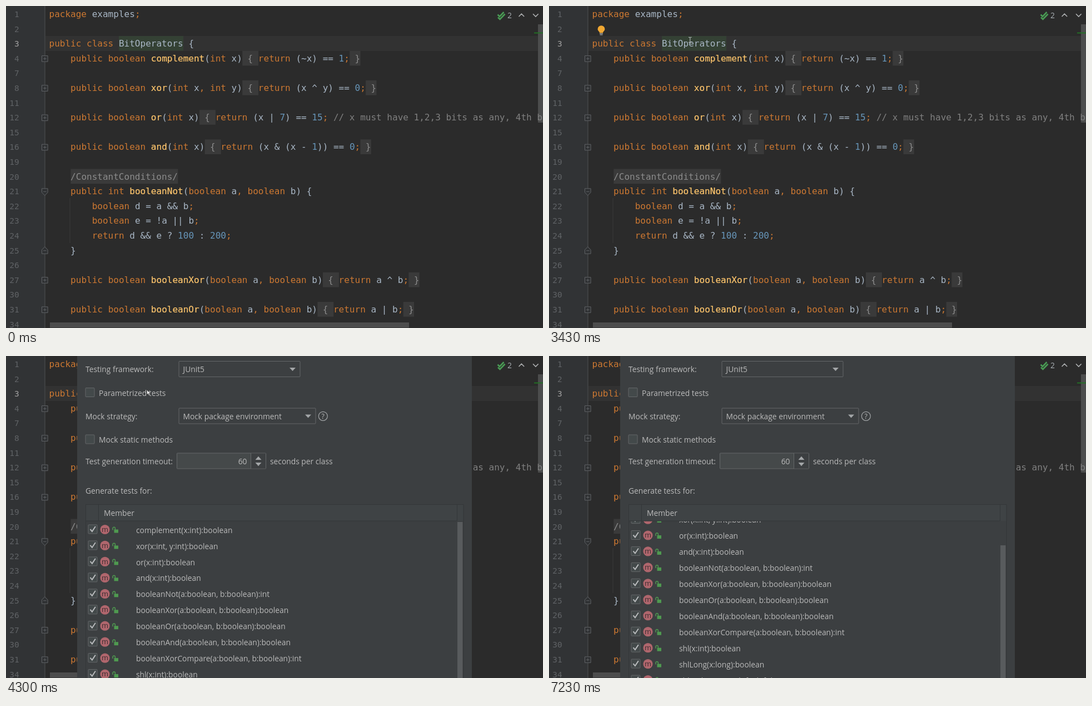
Write an HTML page that moves like this. It is 966x580 px and loops after 8000 ms.

```html
<!DOCTYPE html>
<html lang="en">
<head>
<meta charset="utf-8">
<title>Test generation dialog</title>
<style>
  html, body { margin: 0; width: 100%; height: 100%; overflow: hidden; background: #2b2b2b; }
  svg { display: block; width: 100%; height: 100%; }
  text { white-space: pre; }
  .code { font: 16.03px "DejaVu Sans Mono", monospace; }
  .num { font: 14.5px "DejaVu Sans Mono", monospace; }
  .ui { font: 13.8px "Open Sans", "Noto Sans", sans-serif; fill: #bbbbbb; }
</style>
</head>
<body>
<svg id="stage" viewBox="0 0 966 580"></svg>
<script>
const NS = 'http://www.w3.org/2000/svg';
const stage = document.getElementById('stage');

function add(parent, tag, attrs = {}, content) {
  const el = document.createElementNS(NS, tag);
  for (const key in attrs) el.setAttribute(key, attrs[key]);
  if (content !== undefined) el.textContent = content;
  parent.appendChild(el);
  return el;
}
const rect = (p, x, y, width, height, fill, more) =>
  add(p, 'rect', { x, y, width, height, fill, ...more });
const path = (p, d, fill, more) => add(p, 'path', { d, fill, ...more });
const line = (p, d, stroke, width = 1) => path(p, d, 'none', { stroke, 'stroke-width': width });
const show = (el, on) => el.setAttribute('visibility', on ? 'visible' : 'hidden');

// ---------- Editor ----------
const LEFT = 77.5, COL = 9.65, LINE = 26.6;
const ORANGE = '#cc7832', PLAIN = '#a9b7c6';
const KEYWORDS = /^(package|public|class|boolean|int|return)$/;

// Square brackets mark folded regions.
const SOURCE = [
  [1, 'package examples;'],
  [2, ''],
  [3, 'public class BitOperators {'],
  [4, '    public boolean complement(int x)[ { ]return (~x) == 1;[ }]'],
  [7, ''],
  [8, '    public boolean xor(int x, int y)[ { ]return (x ^ y) == 0;[ }]'],
  [11, ''],
  [12, '    public boolean or(int x)[ { ]return (x | 7) == 15; // x must have 1,2,3 bits as any, 4th b'],
  [15, ''],
  [16, '    public boolean and(int x)[ { ]return (x & (x - 1)) == 0;[ }]'],
  [19, ''],
  [20, '    [/ConstantConditions/]'],
  [21, '    public int booleanNot(boolean a, boolean b) {'],
  [22, '        boolean d = a && b;'],
  [23, '        boolean e = !a || b;'],
  [24, '        return d && e ? 100 : 200;'],
  [25, '    }'],
  [26, ''],
  [27, '    public boolean booleanXor(boolean a, boolean b)[ { ]return a ^ b;[ }]'],
  [30, ''],
  [31, '    public boolean booleanOr(boolean a, boolean b)[ { ]return a | b;[ }]'],
  [34, '']
];

function tokenColor(token, next) {
  if (KEYWORDS.test(token) || /^[,;]$/.test(token)) return ORANGE;
  if (/^\d/.test(token)) return '#6897bb';
  if (token.startsWith('//')) return '#808080';
  if (/^\w/.test(token) && next === '(') return '#ffc66d';
  return PLAIN;
}

function drawCode(parent, src, mid) {
  let brackets = 0;
  for (const m of src.matchAll(/\[[^\]]*\]|\/\/.*|\w+|[^\w\s]/g)) {
    let token = m[0];
    const x = LEFT + (m.index - brackets) * COL;
    let fill = tokenColor(token, src[m.index + token.length]);
    if (token[0] === '[') {
      token = token.slice(1, -1);
      brackets += 2;
      fill = '#8c8c8c';
      rect(parent, x + 0.3, mid - 13.3, token.length * COL, LINE, '#3a3a3a');
    }
    const bold = fill === '#ffc66d' ? { stroke: fill, 'stroke-width': 0.2 } : {};
    add(parent, 'text', { class: 'code', x, y: mid + 5.6, fill, ...bold }, token);
  }
}

function drawFold(parent, n, src, y) {
  const stroke = '#606366', cx = 69.8;
  const box = (d, sign) => {
    path(parent, d, '#2f3133', { stroke });
    line(parent, sign, stroke);
  };
  const minus = `M${cx - 2.7} ${y}h5.4`;
  if (n === 21) box(`M${cx - 5.3} ${y - 5.5}h10.6v7l-5.3 5.5l-5.3 -5.5z`, minus);
  else if (n === 25) box(`M${cx - 5.3} ${y + 5.5}h10.6v-7l-5.3 -5.5l-5.3 5.5z`, minus);
  else if (src.includes('[ {'))
    box(`M${cx - 5.3} ${y - 5.3}h10.6v10.6h-10.6z`, `${minus}M${cx} ${y - 2.7}v5.4`);
}

const editor = add(stage, 'g');
rect(editor, 0, 0, 966, 580, '#2b2b2b');
rect(editor, 0, 0, 70, 580, '#313335');
rect(editor, 71, 54, 895, 27, '#323232');
line(editor, 'M70 0V580', '#505355');
line(editor, 'M115 346V427', '#3b3b3b');
rect(editor, 79, 570, 646, 9.5, '#4d4d4d');
rect(editor, 957, 33, 9, 177, '#4c4d4d');
rect(editor, 203, 54, 116, 26.5, '#344134');
SOURCE.forEach(([n, src], i) => {
  const mid = 14.3 + i * LINE;
  add(editor, 'text', {
    class: 'num', x: 23.8, y: mid + 5.6, 'text-anchor': 'end', fill: n === 3 ? '#a4a3a3' : '#606366'
  }, n);
  drawFold(editor, n, src, mid + 0.8);
  drawCode(editor, src, mid);
});
rect(editor, 950, 47.5, 16, 2, '#236e25');
line(editor, 'M884.5 15.5l3.5 3.5l7.5 -8M885 20.5l3.5 3.5l9 -9.5', '#499c54', 2.6);
add(editor, 'text', { class: 'ui', x: 902, y: 22, style: 'fill:#a9b0b5' }, '2');
line(editor, 'M922.5 19l4.8 -4.8l4.8 4.8M948 14.3l4.8 4.8l4.8 -4.8', '#afb1b3', 1.6);

const caret = rect(editor, 251, 55, 2, 23, '#bbbbbb');
const bulb = add(editor, 'g');
path(bulb, 'M91 48.5C91 46 87.6 45 87.6 41.6A6.4 6.4 0 0 1 100.4 41.6C100.4 45 97 46 97 48.5Z', '#f0a732');
rect(bulb, 91, 49, 6, 1.3, '#a0a3a5');
rect(bulb, 91.5, 51.2, 5, 1.3, '#a0a3a5');

// ---------- Dialog ----------
const dialog = add(stage, 'g');
const BORDER = '#646769', ICON = '#a3a6a8';
const label = (p, x, mid, text, more) => add(p, 'text', { class: 'ui', x, y: mid + 4.9, ...more }, text);
const arrowDown = (x, y) => path(dialog, `M${x - 5.5} ${y - 3}h11l-5.5 6z`, ICON);
const box = (p, x, y, w, h, fill) => rect(p, x + 0.5, y + 0.5, w - 1, h - 1, fill, { stroke: BORDER, rx: 1 });

function combo(x, y, w, text) {
  box(dialog, x, y, w, 29, '#3c3f41');
  label(dialog, x + 8, y + 15.5, text);
  arrowDown(x + w - 14, y + 15);
}
function checkbox(p, x, y, checked) {
  box(p, x, y, 17, 17, '#43494a');
  if (checked) line(p, `M${x + 4} ${y + 8.5}l3.4 4l6 -9`, '#b8babc', 2);
}

rect(dialog, 128, -20, 710, 610, '#3c3f41');
label(dialog, 143, 24.5, 'Testing framework:');
combo(310.5, 9, 219, 'JUnit5');
checkbox(dialog, 142.5, 57);
label(dialog, 167, 67, 'Parametrized tests');
label(dialog, 143, 109, 'Mock strategy:');
combo(310.5, 93.5, 247, 'Mock package environment');
add(dialog, 'circle', { cx: 570.3, cy: 108.3, r: 8, fill: 'none', stroke: ICON, 'stroke-width': 1.2 });
label(dialog, 570.3, 108.2, '?', { 'text-anchor': 'middle', style: 'font-size:12.5px' });
checkbox(dialog, 142.5, 141.5);
label(dialog, 167, 151.5, 'Mock static methods');
label(dialog, 143, 190, 'Test generation timeout:');
box(dialog, 307, 174.5, 161, 29, '#45494a');
rect(dialog, 441, 175.5, 26, 27, '#3c3f41');
line(dialog, 'M440.5 175V203', BORDER);
label(dialog, 433.5, 190, '60', { 'text-anchor': 'end' });
path(dialog, 'M448.5 187h11l-5.5 -6.2zM448.5 192h11l-5.5 6.2z', ICON);
label(dialog, 475, 190, 'seconds per class');
label(dialog, 143, 243.5, 'Generate tests for:');

// ---------- Member table ----------
const ROW = 28.95, ROWS_TOP = 299, SCROLL = 47.4;
const MEMBERS = [
  'complement(x:int):boolean', 'xor(x:int, y:int):boolean', 'or(x:int):boolean', 'and(x:int):boolean',
  'booleanNot(a:boolean, b:boolean):int', 'booleanXor(a:boolean, b:boolean):boolean',
  'booleanOr(a:boolean, b:boolean):boolean', 'booleanAnd(a:boolean, b:boolean):boolean',
  'booleanXorCompare(a:boolean, b:boolean):int', 'shl(x:int):boolean', 'shlLong(x:long):boolean',
  'shlWithBigLongShift(shift:long):int'
];

const clip = add(add(stage, 'defs'), 'clipPath', { id: 'rows' });
rect(clip, 143, 297.5, 668, 300, '#fff');
rect(dialog, 143, 267, 680, 30, '#3f4345');
const table = add(dialog, 'g', { 'clip-path': 'url(#rows)' });
const rows = add(table, 'g');
const hover = rect(rows, 229, 0, 582, ROW, '#464b4e');
MEMBERS.forEach((name, i) => {
  const mid = ROWS_TOP + 14.5 + i * ROW;
  checkbox(rows, 147.5, mid - 10, true);
  add(rows, 'circle', { cx: 178, cy: mid - 1, r: 8.6, fill: '#b0666d' });
  label(rows, 178, mid - 1.7, 'm', { 'text-anchor': 'middle', style: 'fill:#3a2c30;font-size:13px' });
  rect(rows, 194.5, mid - 1, 7.5, 6, '#4f9a50');
  line(rows, `M192 ${mid}v-3a2.2 2.2 0 0 1 4.4 0v3`, '#4f9a50', 1.5);
  label(rows, 234, mid + 0.2, name);
});
const GRID = '#333638';
line(dialog, 'M143.5 600V267.5H823V600', GRID);
line(dialog, 'M143 297H811M166.5 268V297M811.5 268V297', GRID);
label(dialog, 176, 283, 'Member');
const thumb = rect(dialog, 812, 299, 9.5, 300, '#585b5d');

// ---------- Pointer ----------
const beam = line(stage, 'M-2.8 -4.5h2.2l.6 .5l.6 -.5h2.2M0 -4V4M-2.8 4.5h2.2l.6 -.5l.6 .5h2.2', '#c4c8cb', 1);
const arrow = path(stage, 'M0 0V8.6L2 6.8L3.4 10L4.8 9.4L3.4 6.4H6Z', '#f4f4f4',
  { stroke: '#222', 'stroke-width': 0.5 });

// time, x, y
const TRACK = [
  [500, 265, 7], [700, 262, 30], [900, 258.5, 50], [1100, 257, 56.5],
  [1234, 257, 56.5], [1434, 254.8, 60.5], [4030, 253.5, 61],
  [4900, 253.5, 61], [5034, 251, 95], [5234, 244, 182], [5367, 236, 240],
  [5434, 258, 270], [5567, 378, 325], [5634, 397, 337], [5700, 387.5, 339],
  [6234, 387.5, 339], [6367, 392.5, 343], [6634, 392.5, 343], [7234, 145, 600]
];

function pointerAt(t) {
  const i = TRACK.findIndex(k => k[0] > t);
  if (i < 1) return TRACK[i < 0 ? TRACK.length - 1 : 0].slice(1);
  const [t0, x0, y0] = TRACK[i - 1], [t1, x1, y1] = TRACK[i];
  const u = (t - t0) / (t1 - t0);
  return [x0 + (x1 - x0) * u, y0 + (y1 - y0) * u];
}

// ---------- Timeline ----------
const LOOP = 8000, TICK = 200 / 3, OPEN = 500 + 53 * TICK;

function render(time) {
  const t = 500 + Math.floor((time - 495) / TICK) * TICK;
  const within = (from, to) => t > from - 5 && t < to - 5;

  show(caret, within(1900, 2433) || within(2967, 3433));
  show(bulb, within(3033, OPEN));

  const rest = 1 - Math.min(1, Math.max(0, (t - OPEN) / TICK + 1) / 5);
  const scale = 1 - 0.07 * rest ** 2;
  show(dialog, within(OPEN, LOOP + 100));
  dialog.setAttribute('opacity', 1 - rest ** 2.2);
  dialog.setAttribute('transform', `translate(483 374) scale(${scale}) translate(-483 -374)`);

  const scroll = within(5900, LOOP + 100) ? SCROLL : 0;
  rows.setAttribute('transform', `translate(0 ${-scroll})`);
  thumb.setAttribute('y', scroll ? 341 : 299);

  const [x, y] = pointerAt(t);
  const arrowOn = within(OPEN, 7233);
  show(beam, within(500, OPEN));
  show(arrow, arrowOn);
  for (const el of [beam, arrow]) el.setAttribute('transform', `translate(${x} ${y})`);

  const index = Math.floor((y - ROWS_TOP + scroll) / ROW);
  hover.setAttribute('y', ROWS_TOP + index * ROW);
  hover.setAttribute('opacity', arrowOn && y > 298 ? 1 : 0);
}

const start = performance.now();
function loop() {
  render((performance.now() - start) % LOOP);
  requestAnimationFrame(loop);
}
loop();
</script>
</body>
</html>
```
